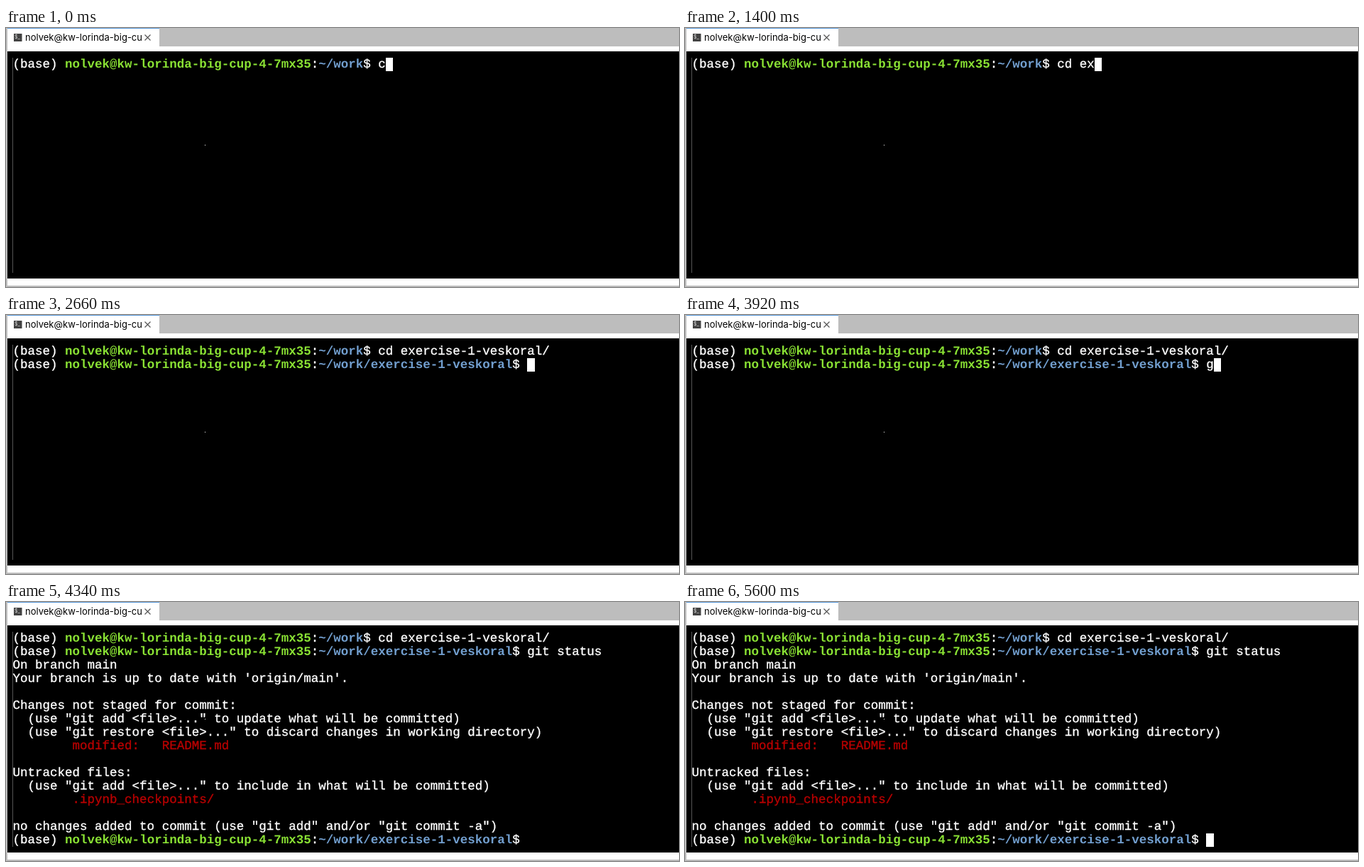
Recreate the animation shown at these times as an HTML page. Size 948 by 366 pixels, loop 5960 ms.

```html
<!DOCTYPE html>
<html lang="en">
<head>
<meta charset="utf-8">
<title>Terminal session</title>
<style>
  html, body { margin: 0; width: 100%; height: 100%; overflow: hidden; }
  body { position: relative; background: #bdbdbd; }
  body > *, #cursor { position: absolute; }
  #panel { left: 2px; top: 26px; right: 0; height: 338px; background: #fff; }
  #tab { left: 2px; top: 0; width: 214px; height: 27px; box-sizing: border-box; background: #fff; border-top: 1px solid #5b9bdc; }
  #label { left: 27px; top: 4px; width: 165px; overflow: hidden; white-space: nowrap; font: 13px/19px Inter, sans-serif; color: #000; }
  #icons { left: 0; top: 0; }
  #terminal { left: 2px; top: 33px; right: 0; height: 321px; background: #000; }
  #edge { left: 9px; top: 42px; width: 1px; height: 304px; background: #555; }
  #speck { left: 280px; top: 165px; width: 1px; height: 1px; background: #fff; }
  #screen { left: 9.6px; top: 43px; margin: 0; color: #fff; font: 17.5px/19px "Liberation Mono", monospace; text-rendering: geometricPrecision; -webkit-text-stroke: .35px; }
  #cursor { width: 1ch; height: 19px; margin-top: -1px; background: #fff; }
  b { -webkit-text-stroke: 0; }
  .host { color: #8ae234; }
  .path { color: #729fcf; }
  .file { color: #b80000; }
</style>
</head>
<body>
<div id="panel"></div>
<div id="tab"></div>
<div id="label"></div>
<svg id="icons" width="216" height="26">
  <rect x="11" y="8" width="11.5" height="11" fill="#424242"/>
  <text x="12" y="15" font-family="Inter, sans-serif" font-size="7" fill="#ddd">$_</text>
  <path d="M195.5 9.5l8 8m0-8l-8 8" stroke="#555" stroke-width="1.2"/>
</svg>
<div id="terminal"></div>
<div id="edge"></div>
<pre id="screen"><span id="text"></span><span id="cursor"></span></pre>
<div id="speck"></div>
<script>
const LOOP = 5960, LAST_CHANGE = 5600, TICK = 140, LINE_HEIGHT = 19;
const CURSOR_HOLD = 560, IDLE_START = 4320, IDLE_BLINK = 240;

const host = 'nolvek@kw-lorinda-big-cup-4-7mx35';
const folder = 'exercise-1-veskoral';
const paths = ['~/work', '~/work/' + folder];
const output = `On branch main
Your branch is up to date with 'origin/main'.

Changes not staged for commit:
  (use "git add &lt;file>..." to update what will be committed)
  (use "git restore &lt;file>..." to discard changes in working directory)
        <span class="file">modified:   README.md</span>

Untracked files:
  (use "git add &lt;file>..." to include in what will be committed)
        <span class="file">.ipynb_checkpoints/</span>

no changes added to commit (use "git add" and/or "git commit -a")
`;

// Keyboard input: the tick at which each piece of text is entered.
const keys = [
  { tick: 0, input: 'c' },
  { tick: 1, input: 'd ' },
  { tick: 3, input: 'e' },
  { tick: 10, input: 'x' },
  { tick: 12, input: 'e' },
  { tick: 13, input: 'r' },
  { tick: 15, input: folder.slice(4) + '/' },
  { tick: 19, input: '\n' },
  { tick: 28, input: 'g' },
  { tick: 29, input: 'i' },
  { tick: 30, input: 't ' },
  { tick: 31, input: 'status\n' }
];

const byId = id => document.getElementById(id);
const text = byId('text'), cursor = byId('cursor');
byId('label').textContent = host;

const pathAt = index => paths[Math.min(index, 1)];
const prompt = index =>
  `(base) <b class="host">${host}</b>:<b class="path">${pathAt(index)}</b>$ `;

function cursorVisible(time, lastKey) {
  if (lastKey === keys.at(-1)) return Math.floor((time - IDLE_START) / IDLE_BLINK) % 2 === 1;
  return time - lastKey.tick * TICK < CURSOR_HOLD;
}

function show(time) {
  const pressed = keys.filter(key => key.tick * TICK <= time);
  const commands = pressed.map(key => key.input).join('').split('\n');
  const active = commands.length - 1;
  const lines = commands.map((command, index) => prompt(index) + command);
  if (active === 2) lines[1] += '\n' + output.trimEnd();
  const html = lines.join('\n');
  text.innerHTML = html;

  const column = `(base) ${host}:${pathAt(active)}$ `.length + commands[active].length;
  cursor.style.left = column + 'ch';
  cursor.style.top = (html.split('\n').length - 1) * LINE_HEIGHT + 'px';
  cursor.style.visibility = cursorVisible(time, pressed.at(-1)) ? 'visible' : 'hidden';
}

const started = performance.now();
let shown;
function draw() {
  const time = Math.min((performance.now() - started) % LOOP, LAST_CHANGE);
  const tickTime = Math.floor(time / TICK) * TICK;
  if (tickTime !== shown) show(shown = tickTime);
  requestAnimationFrame(draw);
}
draw();
</script>
</body>
</html>
```
